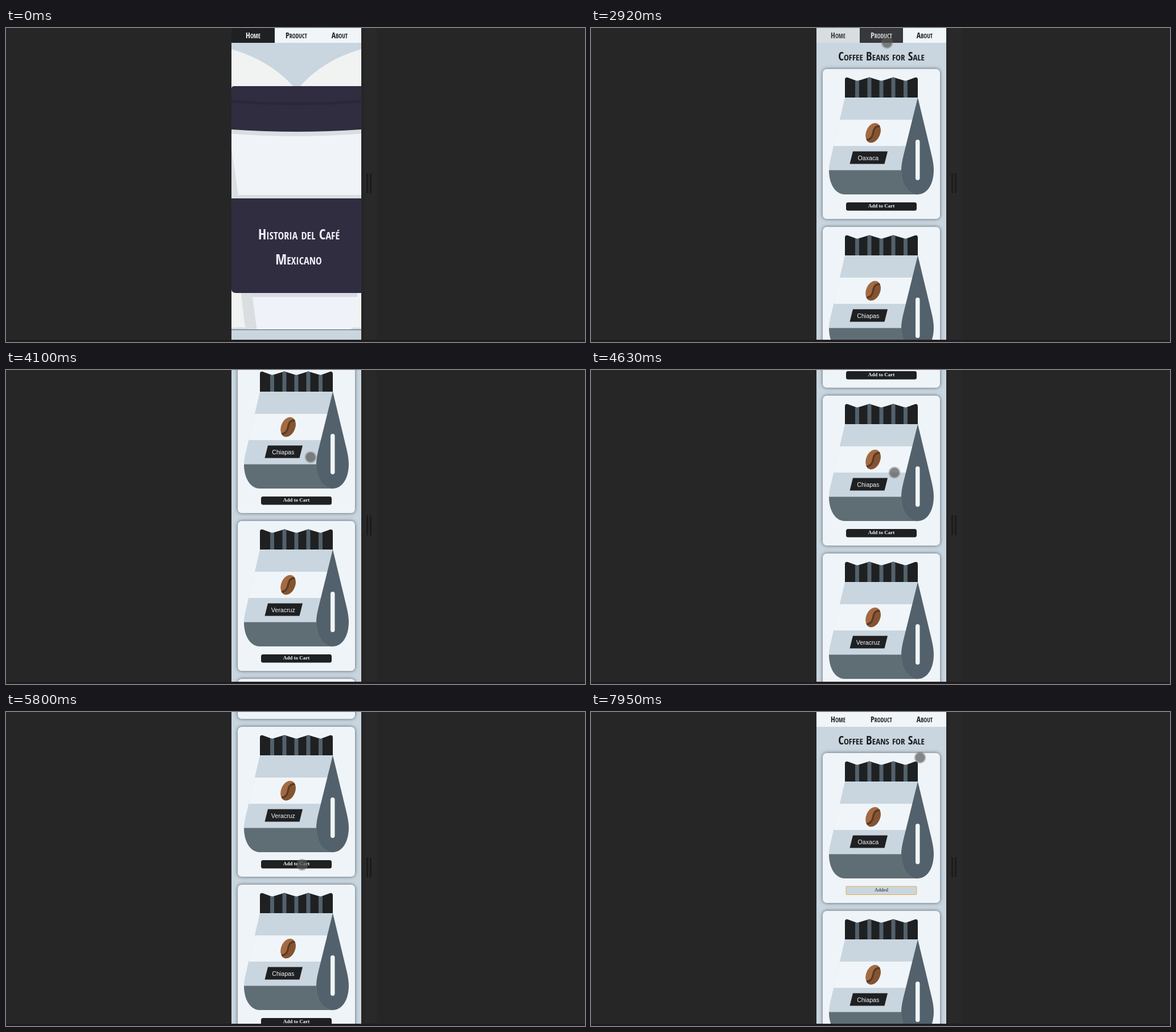
Write an HTML page that moves like this. It is 1017x551 px and loops after 8 s.

```html
<!DOCTYPE html>
<html lang="en">
<head>
<meta charset="utf-8">
<title>Coffee shop on a phone</title>
<style>
  html, body { margin: 0; width: 100%; height: 100%; overflow: hidden; background: #262626; }
  svg { display: block; width: 100vw; height: 100vh; }
  text { text-anchor: middle; }
  .hand {
    font-family: "Amatic SC", "Noto Sans ExtraCondensed", "Open Sans Condensed", "Roboto Condensed",
      "Liberation Sans Narrow", "DejaVu Sans Condensed", "Noto Sans", sans-serif;
    font-stretch: 62.5%;
    font-variant: small-caps;
    font-size: var(--em, 20px);
    fill: #1e2022;
  }
  .hero { font-size: calc(var(--em, 20px) * 1.2); fill: #eceff5; }
  .nav { font-size: calc(var(--em, 20px) * .66); }
  .tag { font: 10.7px "Liberation Sans", Arial, sans-serif; fill: #f0f5f9; }
  .btn { font: bold 9px "Liberation Serif", "Times New Roman", serif; fill: #f0f5f9; }
</style>
</head>
<body>
<svg viewBox="0 0 1017 551" preserveAspectRatio="none">
  <defs>
    <clipPath id="screen"><rect x="396" width="228" height="547"/></clipPath>
    <clipPath id="ruffle">
      <path d="M446 122V91Q446 86 451 87L467.500 93 489 86.500 510 93 531 86.500 552.500 93 569 87Q574 86 574 91V122Z"/>
    </clipPath>
    <clipPath id="bean"><ellipse cx="495.500" cy="184" rx="12.300" ry="18" transform="rotate(22 495.500 184)"/></clipPath>
    <clipPath id="body"><path d="M446 122H574V292H446C430 292 418 275 418 249Q418 241 421 229Z"/></clipPath>
    <filter id="blur" x="-10%" y="-10%" width="120%" height="120%"><feGaussianBlur stdDeviation="3.200"/></filter>

    <g id="card">
      <rect x="407" y="72" width="206" height="263" rx="7" fill="#52616b" filter="url(#blur)"/>
      <rect x="407" y="72" width="206" height="263" rx="7" fill="#eff4f8"/>
      <g clip-path="url(#ruffle)">
        <path d="M446 80H574V122H446Z" fill="#1e2022"/>
        <path d="M467.500 80V122M489 80V122M510 80V122M531 80V122M552.500 80V122" stroke="#52616b" stroke-width="7"/>
      </g>
      <g clip-path="url(#body)">
        <path d="M410 122H580V292H410Z" fill="#c9d6df"/>
        <path d="M410 161H580V207H410Z" fill="#f0f5f9"/>
        <path d="M410 249.500H580V292H410Z" fill="#5f6d75"/>
      </g>
      <path d="M574 122L549 223Q545 239 545 249C545 275 558 292 574 292S602 275 602 249Q602 239 598.500 224Z" fill="#52616b"/>
      <path d="M545 249C545 275 558 292 574 292" fill="none" stroke="#6d7b84" stroke-width=".6"/>
      <rect x="570" y="196" width="7.500" height="71" rx="3.700" fill="#f0f5f9"/>
      <g clip-path="url(#bean)" fill="none">
        <path d="M478 162H514V206H478Z" fill="#a46a42"/>
        <path d="M510 171C498 171 496 177 495.500 184S492 197 480 197V206H514V171Z" fill="#845432"/>
        <path d="M510 172C498 172 497 177 495.500 184S492 196 480 197" stroke="#5b3a22" stroke-width="3.400"/>
      </g>
      <path d="M460 216.500H521L515.500 238.500H454.500Z" fill="#1e2022"/>
    </g>
    <g id="button">
      <rect x="448" y="306" width="124" height="14.500" rx="3.500" fill="#1e2022"/>
      <text class="btn" x="510" y="315.300">Add to Cart</text>
    </g>
    <radialGradient id="dot">
      <stop offset=".72" stop-color="#555" stop-opacity=".7"/>
      <stop offset=".82" stop-color="#666" stop-opacity=".5"/>
      <stop offset="1" stop-color="#777" stop-opacity=".3"/>
    </radialGradient>
  </defs>

  <path d="M0 0H1017V551H0Z" fill="#262626"/>
  <path d="M630 0H651V547H630Z" fill="#292929"/>
  <path d="M634.500 255V290M640.500 255V290" stroke="#1b1b1b" stroke-width="3"/>
  <path d="M0 547H1017V551H0Z" fill="#221d20"/>

  <g clip-path="url(#screen)">
    <path d="M396 0H624V547H396Z" fill="#c9d6df"/>
    <g id="home">
      <path d="M396 37Q464 57 505 103H396ZM624 37Q556 57 516 103H624ZM396 460H624V529H396Z" fill="#f1f3f2"/>
      <path d="M396 170H624V299H396Z" fill="#f0f3f8"/>
      <path d="M396 170H624V185.500Q510 194 396 185.500ZM396 212L408 293H624V299H396Z" fill="#d9dee1"/>
      <path d="M396 107Q396 102 401 102H624V178Q510 186 396 178Z" fill="#302d40"/>
      <path d="M396 128.500Q510 138 624 128.500" fill="none" stroke="#2a2738" stroke-width="4.500"/>
      <path d="M396 526.500Q410 525 425 526V529H396ZM603 527Q612 525 624 526.500V529H603Z" fill="#d3d9da"/>
      <path d="M433 465H617L613 518Q611 529 601 529H433Z" fill="#eff3f9"/>
      <path d="M413 465H617V472H433L440.500 529H430Q420 529 419 519Z" fill="#d9dee1"/>
      <path d="M433 465H617V472H433Z" fill="#d9dae4"/>
      <path d="M396 299H624V465H404Q396 465 396 458Z" fill="#302d40"/>
      <path d="M396 529.500H624" stroke="#52616b"/>
      <text class="hand hero" x="514.500" y="362" dy=".36em">Historia del Café</text>
      <text class="hand hero" x="514" y="406" dy=".36em">Mexicano</text>
    </g>
    <g id="page">
      <g id="shop">
        <text id="heading" class="hand" x="510" y="49.500" dy=".36em">Coffee Beans for Sale</text>
      </g>
      <g id="nav"></g>
    </g>
  </g>

  <path id="arrow" d="M0 0V16.500L3.800 13 6.300 18.800 8.800 17.700 6.300 12H11.500Z" fill="#fff" stroke="#000" stroke-width=".8"/>
  <path id="resize" d="M-8.500 0L-4.500 -3.500V-1H4.500V-3.500L8.500 0 4.500 3.500V1H-4.500V3.500Z" fill="#fff" stroke="#000" stroke-width=".5"/>
  <circle id="touch" r="10.500" fill="url(#dot)"/>
</svg>

<script>
const LOOP = 8000, PITCH = 277, FADE = 550;
const OPEN = 2530, LOADED = 2610, TAP = 6860;
const DARK = [30, 32, 34], LIGHT = [240, 245, 249], SKY = [201, 214, 223];

// time, x, y
const pointerKeys = [
  [440, 893, 540], [1060, 644, 344.5], [1520, 644, 344.5], [2300, 524, 18],
  [2530, 523, 18], [2920, 520, 26], [3000, 520, 26], [3230, 535, 153],
  [4170, 535, 153], [4630, 533, 180], [4940, 532, 181], [5250, 520, 268],
  [5800, 520, 268], [6400, 510, 237], [6500, 510, 237], [6800, 524, 310],
  [7640, 524, 310], [7950, 578, 80]
];
// time, offset
const scrollKeys = [
  [3550, 0], [3930, 361], [4170, 361], [4630, 304], [4940, 304], [5250, 688],
  [5480, 688], [5630, 600], [5800, 600], [6330, 0]
];

const $ = id => document.getElementById(id);
const clamp = v => Math.min(1, Math.max(0, v));
const smooth = v => v * v * (3 - 2 * v);
const mix = (a, b, p) => `rgb(${a.map((v, i) => Math.round(v + (b[i] - v) * p))})`;
const show = (el, on) => el.setAttribute("visibility", on ? "visible" : "hidden");
const move = (el, x, y) => el.setAttribute("transform", `translate(${x} ${y})`);

function add(parent, tag, attrs, text = "") {
  const el = document.createElementNS("http://www.w3.org/2000/svg", tag);
  for (const k in attrs) el.setAttribute(k, attrs[k]);
  el.textContent = text;
  return parent.appendChild(el);
}

function sample(keys, t) {
  if (t <= keys[0][0]) return keys[0].slice(1);
  const i = keys.findIndex(k => k[0] > t);
  if (i < 0) return keys[keys.length - 1].slice(1);
  const [a, b] = [keys[i - 1], keys[i]];
  const p = smooth((t - a[0]) / (b[0] - a[0]));
  return a.slice(1).map((v, j) => v + (b[j + 1] - v) * p);
}

// 0 to 1 over one nav fade, easing out
const fade = (t, start) => 1 - (1 - clamp((t - start) / FADE)) ** 1.75;

["Oaxaca", "Chiapas", "Veracruz", "Chiapas", "Oaxaca", "Veracruz"].forEach((name, i) => {
  const g = add($("shop"), "g", { transform: `translate(0 ${i * PITCH})` });
  add(g, "use", { href: "#card" });
  add(g, "text", { class: "tag", x: 486.8, y: 231.6 }, name);
  if (i) add(g, "use", { href: "#button" });
});

const buy = {
  box: add($("shop"), "rect", { x: 448, y: 306, width: 124, height: 14.5 }),
  label: add($("shop"), "text", { class: "btn", x: 510, y: 315.3 })
};

const tabs = ["Home", "Product", "About"].map((name, i) => ({
  box: add($("nav"), "rect", { x: 396 + i * 76, y: 0, width: 76, height: 26 }),
  label: add($("nav"), "text", { class: "hand nav", x: 434 + i * 76, y: 13, dy: ".36em" }, name)
}));

// Size all lettering from the heading's natural width in the available font.
const em = 20 * 150 / $("heading").getComputedTextLength();
document.documentElement.style.setProperty("--em", Math.min(em, 28) + "px");

function drawTab(tab, level, active) {
  tab.box.setAttribute("fill", mix(LIGHT, DARK, level));
  tab.label.style.fill = mix(DARK, LIGHT, level);
  tab.label.style.fontWeight = active ? "bold" : "normal";
}

function drawButton(t) {
  const added = t >= TAP, p = fade(t, TAP);
  buy.box.setAttribute("fill", mix(DARK, SKY, p));
  buy.box.setAttribute("rx", added ? 1 : 3.5);
  buy.box.setAttribute("stroke", added ? "#e9ad4d" : "none");
  buy.label.textContent = added ? "Added" : "Add to Cart";
  buy.label.style.fill = mix(LIGHT, DARK, p);
  buy.label.style.fontWeight = added ? "normal" : "bold";
}

function drawPointer(t) {
  const [x, y] = sample(pointerKeys, t);
  const kind = t < 440 ? "" : x > 652 ? "arrow" : x > 624 ? "resize" : "touch";
  for (const id of ["arrow", "resize", "touch"]) {
    show($(id), id === kind);
    move($(id), x, y);
  }
  $("touch").setAttribute("r", t >= 2380 && t < OPEN ? 11.5 : 10.5);
}

function frame(now) {
  const t = now % LOOP;
  const shop = t >= LOADED;
  show($("home"), !shop);
  show($("shop"), shop);
  move($("page"), 0, -sample(scrollKeys, t)[0]);
  drawTab(tabs[0], 1 - fade(t, OPEN), t < OPEN);
  drawTab(tabs[1], fade(t, OPEN) - fade(t, TAP), t >= OPEN && t < TAP);
  drawTab(tabs[2], 0, false);
  drawButton(t);
  drawPointer(t);
}

const start = performance.now();
function loop() {
  frame(performance.now() - start);
  requestAnimationFrame(loop);
}
loop();
</script>
</body>
</html>
```
